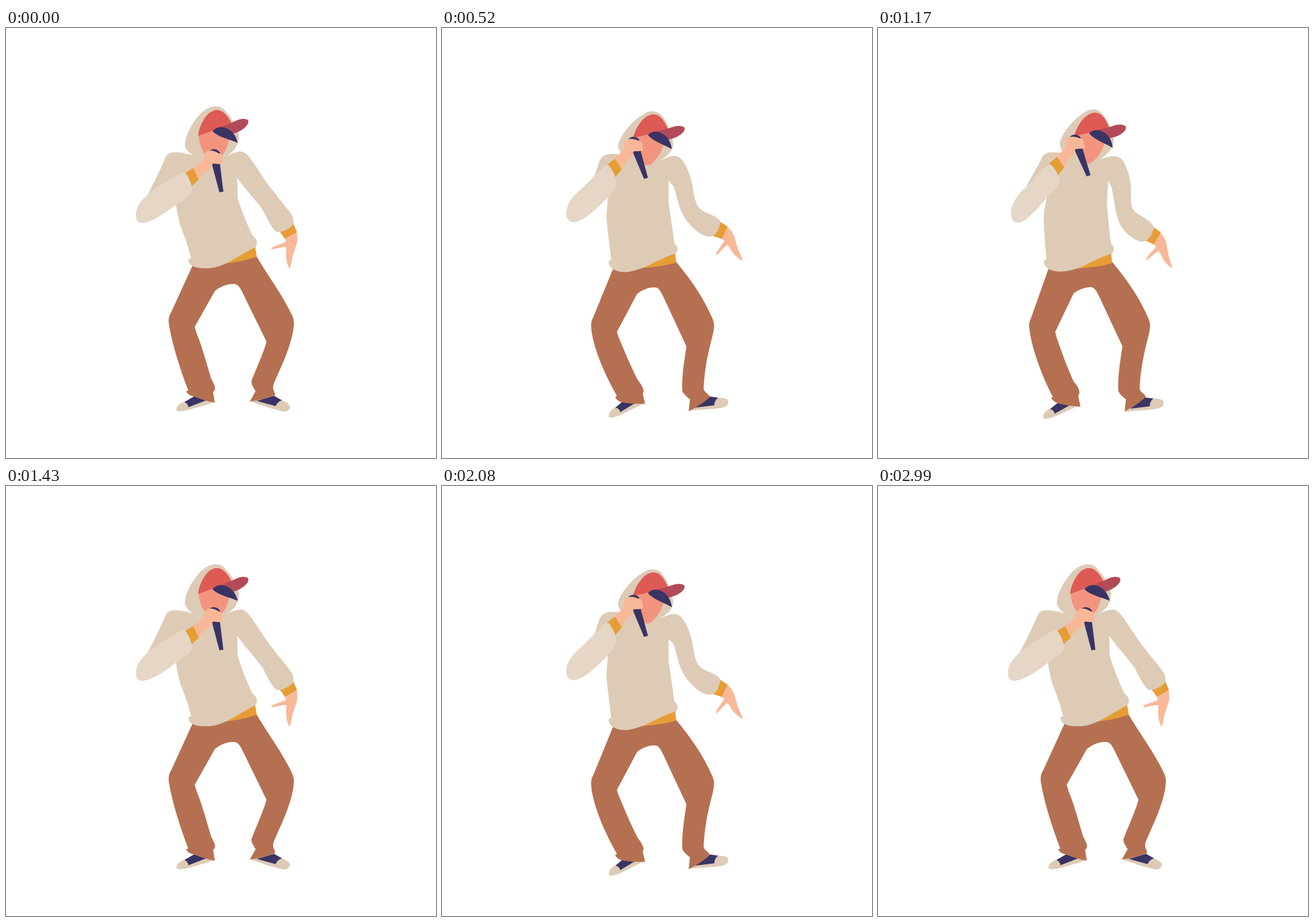
Animation, 748 px wide and 748 px high, one loop 3120 ms. Source, as an HTML page:

```html
<!DOCTYPE html>
<html>
<head>
<meta charset="utf-8">
<style>
html, body { margin: 0; width: 100%; height: 100%; overflow: hidden; background: #fff; }
svg { display: block; width: 100vw; height: 100vh; }
</style>
</head>
<body>
<svg id="stage" viewBox="0.8 0.2 748 748"></svg>
<script>
const BEIGE = '#ddcbb6', SLEEVE = '#e5d6c6', BROWN = '#b57051', ORANGE = '#e79d35',
  NAVY = '#393464', SKIN = '#f8b898', FACE = '#f3947f', RED = '#dd5a55', BILL = '#b24b57';

const stage = document.getElementById('stage');
const updates = [];

function shape(color, d) {
  const el = document.createElementNS('http://www.w3.org/2000/svg', 'path');
  el.setAttribute('fill', color);
  el.setAttribute('d', d);
  return stage.appendChild(el);
}

// Progress through the poses: 0 = upright, 1 = hips shifted, 2 = leaning, beyond = full swing.
function progress(step, reach) {
  return [0, 0.5, 1, 1.4, 2, 1 + reach][step];
}

function blend([start, mid, lean], u) {
  return u < 1 ? start + (mid - start) * u : mid + (lean - mid) * (u - 1);
}

// Soft part: one outline per pose, with matching commands.
function soft(color, poses, reach = 1.9) {
  const el = shape(color, poses[0]);
  const nums = poses.map(d => d.match(/\d+/g).map(Number));
  updates.push(step => {
    const u = progress(step, reach);
    let i = 0;
    el.setAttribute('d', poses[0].replace(/\d+/g, () => {
      const value = blend(nums.map(n => n[i]), u);
      i++;
      return value.toFixed(1);
    }));
  });
}

// Stiff part: fixed outlines, turned about a pivot [x, y, angle] given for each pose.
function stiff(poses, outlines, reach = 1.9) {
  const els = outlines.map(([color, d]) => shape(color, d));
  const [px, py] = poses[0];
  updates.push(step => {
    const u = progress(step, reach);
    const [x, y, turn] = [0, 1, 2].map(k => blend(poses.map(p => p[k]), u));
    for (const el of els)
      el.setAttribute('transform', `translate(${x} ${y}) rotate(${turn}) translate(${-px} ${-py})`);
  });
}

// Shoes
stiff([[297, 665, 0], [288, 679, -8], [291, 677, -10]], [
  [BEIGE, 'M297,664C298,657 304,652 312,650L340,645L361,652C345,657 325,663 312,666C305,667 298,668 297,664Z'],
  [NAVY, 'M311,651L328,641L349,648L318,660C318,656 315,652 311,651Z']
]);
stiff([[425, 650, 0], [429, 668, -22.5], [430, 666, -22]], [
  [BEIGE, 'M425,650L450,645L481,648C490,652 495,655 495,660C494,666 488,668 481,667C462,663 443,655 425,650Z'],
  [NAVY, 'M437,649L467,640L481,648C476,649 471,654 470,658Z']
]);

// Trousers
soft(BROWN, [
  'M326,412L288,495C283,503 283,510 285,520C290,550 303,592 318,631L314,632C317,638 322,640 327,641C340,646 352,650 364,652L361,633C366,630 366,625 358,611C348,577 340,549 333,533L329,520L364,458C374,449 390,444 400,446L405,400Z',
  'M297,420L267,505C262,514 264,520 265,530C270,562 287,608 305,642L302,644C306,650 312,653 317,654C329,657 341,658 353,659L349,640C353,636 352,627 341,615C328,586 319,560 312,540L309,529L341,462C351,454 364,450 374,451L380,405Z',
  'M298,420L264,503C259,512 260,518 261,528C266,562 285,605 305,640L302,643C306,649 312,651 317,652C329,654 342,654 354,654L350,636C353,633 352,626 341,612C326,582 316,557 308,538L305,529L340,463C350,455 364,450 374,452L380,405Z'
]);
const rightLeg = 'M374,452C378,453 381,458 385,466L426,554C423,574 417,610 419,632C421,637 426,641 432,646L430,667C443,660 455,653 467,642C464,635 455,634 456,625C458,588 465,560 472,533C474,522 476,516 471,505C456,470 434,438 408,407L368,408Z';
soft(BROWN, [
  'M400,446C404,447 407,450 411,458L454,546C449,565 435,595 428,614C427,619 430,624 435,632L425,650C440,648 455,644 469,639C468,630 463,630 467,618C480,588 494,560 500,529C502,515 503,510 498,499C482,465 458,434 437,398L395,402Z',
  rightLeg, rightLeg
]);

// Shirt hem
stiff([[434, 383, 0], [406, 394, 3], [406, 393, 3]], [
  [ORANGE, 'M375,411L434,380L437,398C420,404 400,408 375,411Z']
]);

// Hoodie body
soft(BEIGE, [
  'M326,222C305,216 295,216 288,217C280,219 278,226 276,231C266,254 256,273 247,291L296,305C299,325 303,340 304,344C312,364 319,384 323,401C317,401 317,406 320,410C325,418 345,419 356,418C365,417 375,414 383,410C400,402 420,388 434,382C439,377 439,368 430,362C417,335 408,310 404,296L403,261L420,230C418,217 412,213 404,216C397,217 390,220 383,224Z',
  'M327,219C312,216 303,216 297,217C288,219 286,225 284,230C276,246 267,260 260,273L295,293C291,312 289,322 289,332C290,358 292,382 294,403C289,403 288,409 291,413C296,421 308,424 318,424C331,424 343,420 354,416C371,408 391,397 407,393C413,389 412,380 406,375C403,350 400,320 399,304L401,266L420,234C418,224 412,222 406,224C399,225 393,226 387,228Z',
  'M318,222C302,218 295,219 289,220C280,222 277,227 275,231C271,243 268,253 264,262L289,288C289,310 287,322 287,332C289,358 293,382 295,404C290,404 290,409 292,413C297,422 310,425 320,425C332,424 343,420 354,416C371,408 391,397 406,393C413,389 412,380 405,375C402,350 397,320 395,304L395,266L413,234C410,223 404,222 398,224C391,226 385,228 379,231Z'
]);

// Free arm
const SWING = 2.5;
stiff([[497, 361, 0], [487, 366, -29], [493, 356, -35]], [
  [SKIN, 'M485,364L506,355C508,363 508,368 507,374C504,384 500,394 498,402C497,409 496,415 494,419C490,412 488,404 488,396C488,391 489,386 488,381C480,381 472,384 465,385C462,385 461,383 464,382C472,377 482,376 488,372Z'],
  [ORANGE, 'M500,339L507,355L486,367L476,353Z']
], SWING);
soft(BEIGE, [
  'M403,216C413,213 420,219 424,225C436,240 446,258 457,273C471,291 485,308 495,321C501,329 501,335 501,341C494,350 482,356 472,355C463,350 457,334 447,316C433,297 417,280 413,274L403,261Z',
  'M404,224C417,221 424,226 428,233C437,249 441,266 441,284C440,305 441,314 449,321C460,329 475,335 481,347C479,358 473,367 466,371C455,376 437,362 427,350C413,331 413,302 407,277L401,266Z',
  'M398,224C408,220 416,226 420,232C431,248 436,268 438,284C441,305 447,315 456,319C468,325 479,328 485,336C484,349 479,358 473,361C462,368 445,357 432,342C413,322 411,297 404,276L395,266Z'
], SWING);

// Hood and head
soft(BEIGE, [
  'M326,222C318,216 312,210 312,203C313,180 335,150 347,143C357,135 372,134 380,142C392,154 402,170 406,187C406,205 398,215 383,224L355,245Z',
  'M327,219C318,212 317,207 317,200C320,185 339,160 360,147C370,140 381,140 389,147C399,158 407,173 411,194C412,206 403,219 387,228L355,242Z',
  'M318,222C309,215 307,210 307,203C311,188 330,162 352,150C362,143 373,143 382,151C392,163 399,179 403,201C404,211 395,223 379,231L345,245Z'
]);
stiff([[335, 188, 0], [342.3, 188.3, 7], [333.3, 191.8, 6]], [
  [FACE, 'M336,187L362,177L390,189C387,205 383,215 377,222C372,231 366,234 361,232C352,229 337,212 336,187Z'],
  [RED, 'M335,188C337,168 350,148 360,145C367,141 377,143 384,152C389,158 392,163 394,168L372,176L360,179Z'],
  [BILL, 'M360,180C372,172 385,169 396,164C408,157 419,157 422,161C425,168 412,180 396,184L370,180Z'],
  [NAVY, 'M360,180C365,173 374,171 382,174C394,177 401,188 404,200C390,194 370,190 360,180Z']
]);

// Microphone arm
stiff([[366, 237, 0], [349.5, 211, -9.8], [339.5, 215, -8]], [
  [NAVY, 'M353,216C357,209 368,209 373,217L373,237L379,285L372,286L359,237Z'],
  [SKIN, 'M325,246C332,238 342,233 345,229C346,222 346,217 350,215C356,212 364,214 370,218C378,220 379,225 377,229L378,236C372,238 367,236 361,236C357,242 358,246 352,248C346,251 340,258 335,265Z'],
  [ORANGE, 'M311,253L327,244L336,264L323,276Z']
]);
soft(SLEEVE, [
  'M313,252C310,250 306,251 303,253C285,264 265,275 249,289C236,299 229,309 227,322C225,335 231,340 240,339C257,337 278,322 296,308C309,300 321,293 324,284C326,276 320,262 313,252Z',
  'M302,238C299,237 296,238 294,240C283,251 268,267 254,281C242,292 234,306 232,319C231,333 237,339 245,339C260,337 280,312 296,294C307,284 316,275 317,268C317,260 310,246 302,238Z',
  'M291,239C288,237 285,239 283,241C270,254 254,270 239,284C226,295 219,306 217,320C216,333 222,338 231,338C248,335 269,316 286,298C296,289 303,279 304,272C305,264 300,250 291,239Z'
]);

// Six stepped poses, played forward and then back.
function draw() {
  const tick = Math.floor(performance.now() / 130) % 12;
  const step = Math.min(tick, 11 - tick);
  updates.forEach(update => update(step));
  requestAnimationFrame(draw);
}
draw();
</script>
</body>
</html>
```
